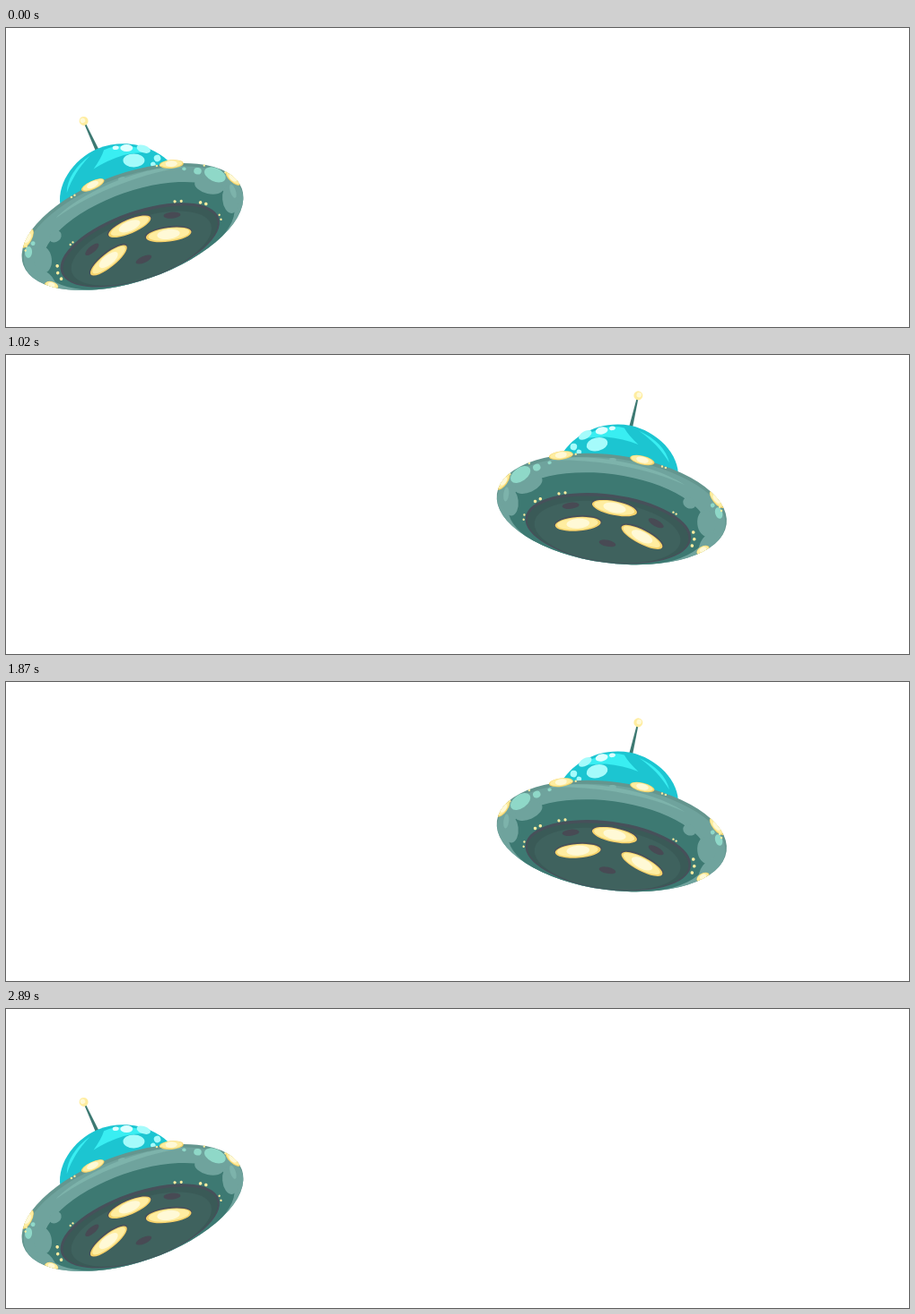
Animation of 1006 by 334 pixels, one loop 3060 ms. Source, as an HTML page with a canvas:

```html
<!DOCTYPE html>
<html lang="en">
<head>
<meta charset="utf-8">
<title>Flying saucer</title>
<style>
  html, body { margin: 0; width: 100%; height: 100%; overflow: hidden; background: #fff; }
  canvas { display: block; }
</style>
</head>
<body>
<canvas id="stage" width="1006" height="334"></canvas>
<script>
const ctx = document.getElementById('stage').getContext('2d');
const STEP = 170, STOPS = 9, MID = 4;
const TILT = 5.8; // degrees gained per stop away from the middle
const RAD = Math.PI / 180;

// key points of the flight, left to right
const path = [[141, 222], [188, 203.5], [289.3, 172], [366, 161.5], [511.5, 145.5],
              [611.5, 165.5], [674.8, 172], [789.5, 193], [858.7, 222]];

// ellipses that carry the details, all leaning by LEAN degrees
const LEAN = 4;
const hull = { x: 511.5, y: 145.5, rx: 129, ry: 60.4 };
const disc = { x: 511, y: 167.5, rx: 93, ry: 38 };

const C = {
  dome: '#1cc5d1', domeLit: '#39eef2', shine: '#a5fbfb', gleam: '#dcffff',
  rim: '#6fa39d', rimShade: '#64968f', rimLit: '#7db3ab', teal: '#3d7972',
  mint: '#8fd8c8', edge: '#47505a', disc: '#3a5a57', discLit: '#3f625e',
  hole: '#484a54', gold: '#f5d36b', cream: '#ffeda0', pale: '#fff9d6'
};

function oval(x, y, rx, ry, deg, fill) {
  ctx.beginPath();
  ctx.ellipse(x, y, rx, ry, deg * RAD, 0, 2 * Math.PI);
  ctx.fillStyle = fill;
  ctx.fill();
}

function ring(e, grow, dy, fill) {
  oval(e.x, e.y + dy, e.rx + grow, e.ry + grow, LEAN, fill);
}

function shape(d, fill) {
  ctx.fillStyle = fill;
  ctx.fill(new Path2D(d));
}

// point on a leaning ellipse scaled by k, with the direction of its tangent
function along(e, deg, k) {
  const c = Math.cos(deg * RAD), s = Math.sin(deg * RAD);
  const u = e.rx * k * c, v = e.ry * k * s;
  const lc = Math.cos(LEAN * RAD), ls = Math.sin(LEAN * RAD);
  return {
    x: e.x + u * lc - v * ls,
    y: e.y + u * ls + v * lc,
    deg: Math.atan2(e.ry * c, -e.rx * s) / RAD + LEAN
  };
}

function spot(deg, k, rx, ry, fill) {
  const p = along(hull, deg, k);
  oval(p.x, p.y, rx, ry, p.deg, fill);
}

function sparks(e, k, from, step, count, r) {
  for (let i = 0; i < count; i++) {
    const p = along(e, from + i * step, k);
    oval(p.x, p.y, r, r, 0, C.cream);
  }
}

function glow(x, y, rx, ry, deg) {
  oval(x, y, rx, ry, deg, C.gold);
  oval(x + 0.4, y - 0.3, rx * 0.9, ry * 0.85, deg, C.cream);
  oval(x, y - 0.5, rx * 0.5, ry * 0.7, deg, C.pale);
}

// rim light: follows the rim and shrinks toward the bottom
function rimLight(deg) {
  const p = along(hull, deg, 0.99);
  glow(p.x, p.y, 10 - 4 * Math.sin(deg * RAD), 4.8, p.deg);
}

function drawDome() {
  shape('M507.3 18 L509 18 L511 52 L507 52 Z', C.teal);
  oval(508, 15.5, 5, 5, 0, C.cream);
  oval(507.2, 14.5, 2.8, 2.8, 0, C.pale);

  shape('M446 97 C449 70 480 50 510 50 C545 51 572 74 580 102 Z', C.dome);
  shape('M459 82 C465 68 480 58 499 54 C483 61 471 69 459 82 Z', C.domeLit);
  shape('M497 69 Q510 61 516 54 Q540 53 562 76 Q545 70 534 68 Q515 66 497 69 Z', C.domeLit);
  oval(542, 78, 12, 7.5, 24, C.shine);
  oval(557, 70.5, 8, 4.2, 42, C.shine);
  oval(540, 62, 7, 4, 24, C.gleam);
  oval(529, 57, 3.5, 2.3, 20, C.gleam);
  oval(567, 86, 3.8, 3.8, 0, C.shine);
  oval(560, 90.5, 2.8, 2.8, 0, C.shine);
}

function drawHull() {
  ctx.save();
  ctx.beginPath();
  ctx.ellipse(hull.x, hull.y, hull.rx, hull.ry, LEAN * RAD, 0, 2 * Math.PI);
  ctx.fillStyle = C.rimShade;
  ctx.fill();
  ctx.clip();

  ring(hull, -1, 3, C.rim);
  shape('M437 103 C470 88 550 86 592 107 C552 96 488 91 437 103 Z', C.rimLit);
  oval(513.5, 157.5, 112, 50.5, LEAN, C.teal);

  // ragged reflections at both ends of the rim
  oval(428, 121.5, 7.5, 6, -15, C.rim);
  oval(405, 140, 10, 15, 18, C.rim);
  oval(400, 160, 6, 13, -25, C.rim);
  oval(608, 137, 16.5, 9, 36, C.rim);
  oval(624, 160, 9, 16, 18, C.rim);
  oval(630, 153, 3, 8, 5, C.rimLit);

  spot(333.5, 0.917, 12.5, 7.5, C.mint);
  spot(320, 0.9, 4.3, 3.8, C.mint);
  spot(310, 0.91, 2.2, 1.8, C.mint);
  spot(191.5, 0.94, 6.5, 4, C.mint);
  spot(200, 0.915, 2.4, 2.4, C.mint);
  spot(273, 0.91, 4, 1.8, C.rimLit);

  for (const deg of [147, 206, 346]) rimLight(deg);
  ctx.restore();
  for (const deg of [258, 300]) rimLight(deg);
}

function drawUnderside() {
  ring(disc, 0, 0, C.edge);
  ring(disc, -2.5, 1, C.disc);
  oval(disc.x, disc.y + 4, 82, 33.5, LEAN, C.discLit);

  // three holes and three lamps alternate around the disc
  for (let deg = -90; deg < 270; deg += 120) {
    const c = Math.cos(deg * RAD), s = Math.sin(deg * RAD);
    oval(508.5 - 56 * c, 162 - 22 * s, 9.5, 3.6, -20 * c, C.hole);
    const x = 508.6 + 42 * c, y = 161 + 17 * s, tilt = 18 * c;
    oval(x, y - 0.8, 26.5, 8.8, tilt, C.edge);
    glow(x, y, 25.5, 7.8, tilt);
  }
}

function drawSparks() {
  sparks(disc, 1.04, 170, 11, 3, 1.8);
  sparks(disc, 1.04, 221, 3, 2, 1.2);
  sparks(disc, 1.04, 303, 5, 2, 1.6);
  sparks(disc, 1.04, 325, 6, 2, 1.8);
  sparks(disc, 1.02, 356, 8, 2, 1.2);
  sparks(hull, 0.97, 194, 4, 2, 1.2);
  sparks(hull, 0.98, 245, 2, 2, 1.2);
  sparks(hull, 0.99, 292, 2.2, 3, 1.2);
  sparks(hull, 0.99, 320, 17, 2, 1.2);
}

function draw(now) {
  const n = Math.floor(now / STEP) % (2 * STOPS);
  const stop = Math.min(n, 2 * STOPS - 1 - n); // there and back, resting at both ends
  const [x, y] = path[stop];
  ctx.clearRect(0, 0, 1006, 334);
  ctx.save();
  ctx.translate(x, y);
  ctx.scale(stop > MID ? -1 : 1, 1);
  ctx.rotate(-TILT * Math.abs(stop - MID) * RAD);
  ctx.translate(-hull.x, -hull.y);
  drawDome();
  drawHull();
  drawUnderside();
  drawSparks();
  ctx.restore();
}

const start = performance.now();
function tick() {
  draw(performance.now() - start);
  requestAnimationFrame(tick);
}
tick();
</script>
</body>
</html>
```
